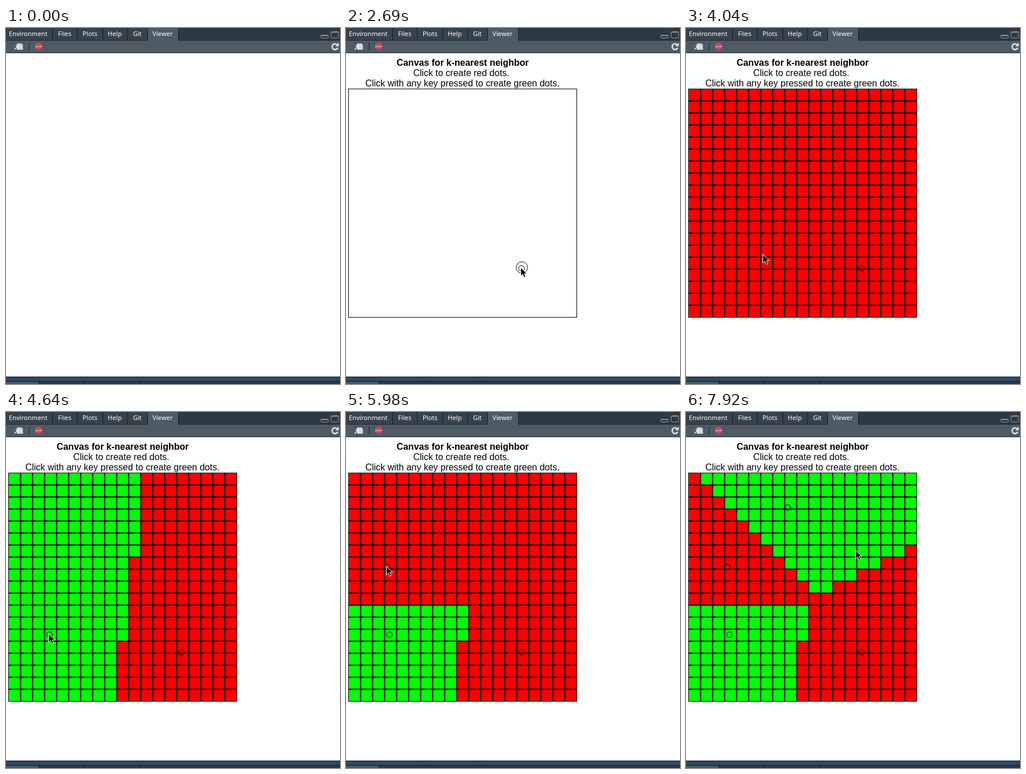
These frames come from a looping animation (584x622 px, 8000 ms). An HTML page:

```html
<!DOCTYPE html>
<html lang="en">
<head>
<meta charset="utf-8">
<title>k-nearest neighbor</title>
<style>
  html, body { margin: 0; width: 100%; height: 100%; overflow: hidden; background: #fff; }
  svg { display: block; }
  .tabs { font: 500 11.2px "Noto Sans", "Open Sans", sans-serif; fill: #fff; }
  .heading { font: 16px "Liberation Sans", Arial, sans-serif; text-anchor: middle; }
  .outline { fill: none; stroke: #000; }
</style>
</head>
<body>
<svg width="584" height="622" viewBox="0 0 584 622">
  <rect width="584" height="622" fill="#fff"/>

  <!-- tab strip and toolbar -->
  <rect width="584" height="22" fill="#2f3941"/>
  <rect width="247" height="21" fill="#37424b"/>
  <rect y="21" width="584" height="1" fill="#1b242b"/>
  <rect y="22" width="584" height="21" fill="#4d5b66"/>
  <rect x="248" width="53" height="22" fill="#4d5b66"/>
  <path d="M81.5 0V21M124.5 0V21M169.5 0V21M212.5 0V21M247.5 0V21M301.5 0V21" stroke="#151d23"/>
  <rect y="43" width="584" height="1" fill="#1d262d"/>
  <g class="tabs">
    <text x="5" y="14">Environment</text>
    <text x="91" y="14">Files</text>
    <text x="134" y="14">Plots</text>
    <text x="178" y="14">Help</text>
    <text x="222" y="14">Git</text>
    <text x="256" y="14">Viewer</text>
  </g>
  <g fill="none" stroke="#8d969c">
    <rect x="550.5" y="12.5" width="13" height="5" rx="1"/>
    <path d="M551 13.5H563"/>
    <rect x="568.5" y="6.5" width="13" height="11" rx="1"/>
    <path d="M569 7.5H581"/>
  </g>
  <path d="M19 27H27L29.500 29.500V38H19Z" fill="#d3d8db"/>
  <path d="M15 37.500L20.500 32M17 31H21.500V35.500" fill="none" stroke="#eef1f2" stroke-width="1.500"/>
  <path d="M40.500 25V39" stroke="#1d262d"/>
  <circle cx="57" cy="32" r="6.500" fill="#c84a52"/>
  <text x="57" y="33.600" font-family="Liberation Sans, sans-serif" font-size="4.300" font-weight="700" text-anchor="middle" fill="#f0c9cb">STOP</text>
  <path d="M579.300 29.500A5 5 0 1 0 580 34.500" fill="none" stroke="#d8dcdf" stroke-width="2.800"/>
  <path d="M582 25.500V32H575.500Z" fill="#d8dcdf"/>

  <!-- bottom edge -->
  <rect y="609" width="584" height="1" fill="#141d26"/>
  <rect y="610" width="584" height="7" fill="#2d4a68"/>
  <rect y="617" width="584" height="5" fill="#2f3941"/>
  <rect y="617" width="584" height="1" fill="#141d26"/>
  <rect y="618" width="57" height="4" fill="#4d5b66"/>
  <path d="M57.500 617V622M136.500 617V622M234.500 617V622" stroke="#10181e"/>

  <g id="page">
    <g class="heading">
      <text x="204" y="66" font-weight="700">Canvas for k-nearest neighbor</text>
      <text x="201.500" y="84">Click to create red dots.</text>
      <text x="203.500" y="102">Click with any key pressed to create green dots.</text>
    </g>
    <g id="grid">
      <g id="cells"></g>
      <path id="lines" stroke="#000" stroke-width="1.900"/>
    </g>
    <rect class="outline" x="4.500" y="106.500" width="399" height="399"/>
    <g id="dots"></g>
    <g id="ring" class="outline">
      <circle cx=".5" cy="-1.500" r="10"/>
      <circle r="5"/>
    </g>
  </g>
  <path id="cursor" d="M0 0V15L3.500 11.800L6 17.300L8.600 16.200L6.200 10.800H11Z" fill="#000" stroke="#fff" stroke-linejoin="round"/>
</svg>
<script>
const LOOP = 8000, N = 19, CELL = 21, LEFT = 4.5, TOP = 106.5;
const RED = '#f00', GREEN = '#0f0';
const $ = id => document.getElementById(id);

const points = [
  { x: 307, y: 420, color: RED, press: 2690, shown: 2840 },
  { x: 76, y: 389, color: GREEN, press: 4490, shown: 4640 },
  { x: 72, y: 271, color: RED, press: 5840, shown: 5980 },
  { x: 178, y: 167, color: GREEN, press: 7180, shown: 7480 }
];

const moves = [
  [3590, 6, [305.5, 418.5], [74.5, 387.5]],
  [5090, 5, [74.5, 387.5], [70.5, 269.5]],
  [6430, 4, [70.5, 269.5], [176.5, 165.5]],
  [7630, 3, [176.5, 165.5], [296.5, 241.5]]
];
const entry = [[330, 576], [300, 502], [282, 446], [298, 425], [305.5, 418.5]];

function add(parent, tag, attrs) {
  const el = document.createElementNS('http://www.w3.org/2000/svg', tag);
  for (const key in attrs) el.setAttribute(key, attrs[key]);
  return parent.appendChild(el);
}

const cells = Array.from({ length: N * N }, (_, i) => {
  const x = LEFT + i % N * CELL, y = TOP + Math.floor(i / N) * CELL;
  return { x, y, el: add($('cells'), 'rect', { x, y, width: CELL, height: CELL }) };
});

let lines = '';
for (let i = 1; i < N; i++) {
  lines += `M${LEFT + i * CELL} ${TOP}v${N * CELL}M${LEFT} ${TOP + i * CELL}h${N * CELL}`;
}
$('lines').setAttribute('d', lines);

for (const p of points) {
  p.el = add($('dots'), 'circle', { cx: p.x, cy: p.y, r: 5, class: 'outline' });
}

const show = (el, on) => el.setAttribute('visibility', on ? 'inherit' : 'hidden');
const place = (el, x, y) => el.setAttribute('transform', `translate(${x} ${y})`);
const ease = u => u * u * (3 - 2 * u);

let painted = -1;
function classify(count) {
  if (count === painted) return;
  painted = count;
  $('grid').setAttribute('visibility', count ? 'inherit' : 'hidden');
  points.forEach((p, i) => show(p.el, i < count));
  if (!count) return;
  const known = points.slice(0, count);
  for (const c of cells) {
    const dist = p => (p.x - c.x) ** 2 + (p.y - c.y) ** 2;
    const nearest = known.reduce((a, b) => dist(b) < dist(a) ? b : a);
    c.el.setAttribute('fill', nearest.color);
  }
}

function pointerAt(t) {
  let pos = entry[Math.min(entry.length - 1, Math.floor((t - 1050) / 150))];
  for (const [start, steps, from, to] of moves) {
    if (t < start) break;
    // the last capture can come up to 10 ms early
    const step = Math.min(steps, Math.floor((t - start + 10) / 150) + 1);
    const k = ease(step / steps);
    pos = from.map((v, i) => v + (to[i] - v) * k);
  }
  return pos;
}

function draw(t) {
  show($('page'), t >= 450);
  classify(points.filter(p => t >= p.shown).length);

  const pressed = points.find(p => t >= p.press && t < p.press + 150 && t < p.shown);
  show($('ring'), pressed);
  if (pressed) place($('ring'), pressed.x, pressed.y);

  show($('cursor'), t >= 1050);
  if (t >= 1050) place($('cursor'), ...pointerAt(t));
}

const begin = performance.now();
function frame() {
  draw((performance.now() - begin) % LOOP);
  requestAnimationFrame(frame);
}
frame();
</script>
</body>
</html>
```
